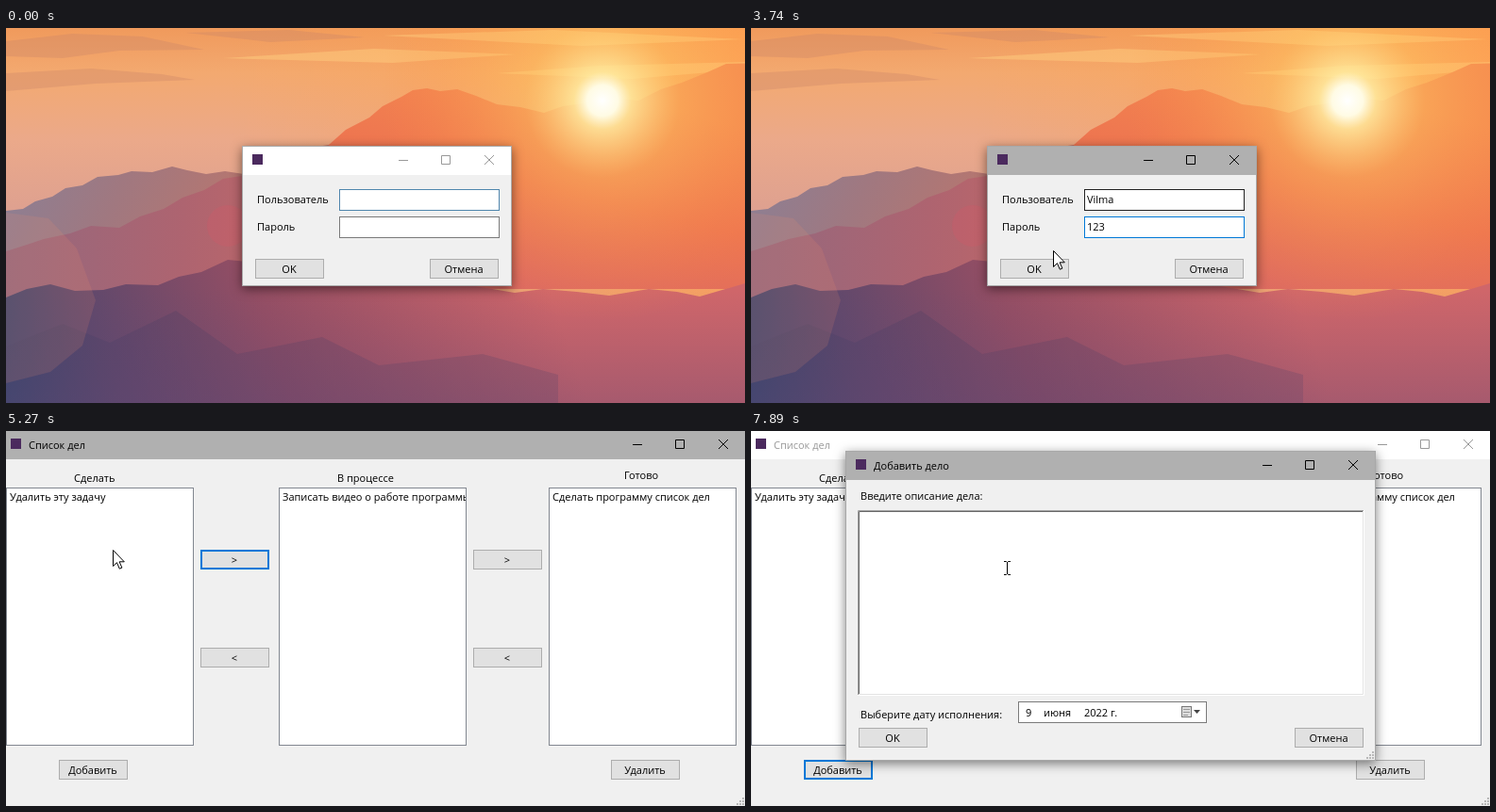
An HTML page for the animation above (7.99 s loop, 783 by 398 pixels).

```html
<!DOCTYPE html>
<html lang="ru">
<head>
<meta charset="utf-8">
<style>
html, body { margin: 0; width: 100%; height: 100%; overflow: hidden; }
svg { display: block; }
text { font: 11px "Open Sans", "Noto Sans", sans-serif; white-space: pre; }
.shadow { filter: drop-shadow(0 3px 6px rgba(0, 0, 0, .5)); }
</style>
</head>
<body>
<svg width="783" height="398" viewBox="0 0 783 398">
  <defs>
    <linearGradient id="sky" x2="0" y2="1">
      <stop stop-color="#f09a5c"/><stop offset=".12" stop-color="#f3a970"/>
      <stop offset=".3" stop-color="#eba98a"/><stop offset=".5" stop-color="#dda090"/>
    </linearGradient>
    <linearGradient id="warm" x1="0" x2="1">
      <stop offset=".3" stop-color="#ffa850" stop-opacity="0"/><stop offset="1" stop-color="#ffa050" stop-opacity=".75"/>
    </linearGradient>
    <linearGradient id="peak" gradientUnits="userSpaceOnUse" x1="600" y1="60" x2="540" y2="300">
      <stop stop-color="#f58a50"/><stop offset=".45" stop-color="#ee7650"/><stop offset="1" stop-color="#d86766"/>
    </linearGradient>
    <linearGradient id="far" x2="1" y2=".2">
      <stop stop-color="#8a8096"/><stop offset=".35" stop-color="#a07880"/><stop offset="1" stop-color="#cc745f"/>
    </linearGradient>
    <linearGradient id="middle" x2="1">
      <stop stop-color="#94687e"/><stop offset=".45" stop-color="#ae6470"/><stop offset="1" stop-color="#cf6a60"/>
    </linearGradient>
    <linearGradient id="near" gradientUnits="userSpaceOnUse" x1="0" y1="420" x2="560" y2="230">
      <stop stop-color="#2c4870"/><stop offset=".2" stop-color="#5e486c"/>
      <stop offset=".5" stop-color="#944e64"/><stop offset="1" stop-color="#cf666a"/>
    </linearGradient>
    <linearGradient id="dusk" x2="0" y2="1">
      <stop offset=".7" stop-color="#6a4874" stop-opacity="0"/><stop offset="1" stop-color="#6a4874" stop-opacity=".4"/>
    </linearGradient>
    <radialGradient id="halo">
      <stop stop-color="#fff"/><stop offset=".07" stop-color="#fffbe4"/><stop offset=".13" stop-color="#ffeb9e" stop-opacity=".85"/>
      <stop offset=".35" stop-color="#ffc860" stop-opacity=".4"/><stop offset="1" stop-color="#ff8a40" stop-opacity="0"/>
    </radialGradient>
  </defs>
  <g id="landscape">
    <path fill="url(#sky)" d="M0 0h783v398H0z"/>
    <path fill="url(#warm)" d="M0 0h783v398H0z"/>
    <path fill="#c98468" opacity=".35" d="M0 14l70-8 75 3 65 14-90 1-60 8L0 30zM0 48l90-5 75 6 35 6-105 4-95 8zM190 5l110-3 80 8-100 5z"/>
    <path fill="#ffd080" opacity=".45" d="M230 32l160-10 150 6-130 9zM400 8l180-6 200 10-170 7zM520 48l110-8 153-4v8l-120 10z"/>
    <path fill="url(#peak)" d="M320 132l22-8 18-16 25-13 14-12 20-10 12-7 15-2 14 3 18-2 20 7 22 9 25 3 25 6 20-7 28-4 32-4 20 2 24-12 22-7 27-11 20-9 40-1v240H320z"/>
    <path fill="url(#far)" d="M0 194l18-2 13-8 18-5 14-9 18-3 16-9 22-2 14-4 22 1 21-6 16 4 20 4 20-3 20 3 30-8 40-20 20-3 40 180H0z"/>
    <path fill="url(#middle)" d="M0 237l22-7 18-6 28-6 22-8 30 2 22-12 25-8 20-12 23-8 20-12 40-6 90 60 60 100H0z"/>
    <path fill="url(#near)" d="M0 286l22-9 25-5 26 7 30-1 24-6 34 1 22-9 24-5 28-13 30 3 60 10 80 10 80 3 54 9 30-4 36 3 34 4 42-7 30 3 24 5 48-14v140H0z"/>
    <path fill="#36375e" opacity=".2" d="M0 338l60-24 50 20 70-34 65 46 90-18 60 30 110-12 80 22v30H0zM110 398l120-50 90 50z"/>
    <path fill="url(#dusk)" d="M0 0h783v398H0z"/>
    <path fill="#ef8b6b" opacity=".15" d="M0 196l45 6 30 32 20 55-14 48-34 28-47 12z"/>
    <circle cx="235" cy="210" r="22" fill="#e04f64" opacity=".2"/>
    <circle cx="632" cy="77" r="235" fill="url(#halo)"/>
  </g>
  <g id="ui"></g>
</svg>
<script>
const LOOP = 7990, TICKS = 79, USER = 'Vilma';
const BLUE = '#0078d7', GRAY = '#7a7a7a', PANEL = '#f0f0f0';
const landscape = document.getElementById('landscape');
const ui = document.getElementById('ui');
const pen = document.createElement('canvas').getContext('2d');
pen.font = '11px "Open Sans", "Noto Sans", sans-serif';

const fill = (x, y, w, h, color, extra = '') =>
  `<rect x="${x}" y="${y}" width="${w}" height="${h}" fill="${color}" ${extra}/>`;
const box = (x, y, w, h, color, stroke, line = 1, extra = '') =>
  fill(x + line / 2, y + line / 2, w - line, h - line, color, `stroke="${stroke}" stroke-width="${line}" ${extra}`);
const text = (x, y, s, extra = '') => `<text x="${x}" y="${y}" ${extra}>${s}</text>`;
const inside = (p, x, y, w, h) => p.x >= x && p.x < x + w && p.y >= y && p.y < y + h;

const LOOKS = {
  plain: ['#e1e1e1', '#adadad', 1],
  hover: ['#e5f1fb', BLUE, 1],
  press: ['#cce4f7', '#005499', 1],
  focus: ['#e1e1e1', BLUE, 2],
};
function button(x, y, label, look = 'plain') {
  return box(x, y, 73, 21, ...LOOKS[look]) + text(x + 36, y + 15, label, 'text-anchor="middle"');
}

function frame(x, y, w, h, title, active, glyphs = active ? '#000' : '#999') {
  const r = x + w;
  return fill(x, y, w, h, PANEL, 'class="shadow"') +
    fill(x, y, w, 31, active ? '#b0b0b0' : '#fff') +
    box(x, y, w, h, 'none', active ? '#a8a8a8' : '#aaa') +
    fill(x + 11, y + 9, 11, 11, '#4b2a5e') +
    text(x + 30, y + 20, title, `fill="${active ? '#000' : '#999'}"`) +
    `<path fill="none" stroke="${glyphs}" d="M${r - 120} ${y + 15.5}h10m35.5-5h9v9h-9zM${r - 29} ${y + 10}l10 10m0-10l-10 10"/>`;
}

function grip(r, b) {
  let dots = '';
  for (let i = 0; i < 3; i++)
    for (let j = 0; j < 3 - i; j++) dots += fill(r - 3 - 3 * i, b - 3 - 3 * j, 2, 2, '#b8b8b8');
  return dots;
}

// Mouse path: tick, x, y
const PATH = [
  [1, 575, 293], [4, 500, 240], [6, 455, 208], [8, 435, 185], [34, 435, 185],
  [35, 400, 200], [36, 320, 236], [37, 279, 249], [39, 289, 251], [42, 289, 251],
  [43, 193, 40], [45, 190, 42], [48, 140, 62], [50, 115, 71], [51, 115, 71],
  [53, 111, 180], [55, 106, 358], [56, 103, 372], [58, 99, 350], [60, 99, 349],
  [67, 99, 349], [69, 92, 331], [77, 92, 331], [78, 271, 145],
];
function mouseAt(n) {
  const i = PATH.findIndex(p => p[0] >= n);
  if (i < 0) return { x: 271, y: 145 };
  if (i === 0) return { x: PATH[0][1], y: PATH[0][2] };
  const [a, b] = [PATH[i - 1], PATH[i]], k = (n - a[0]) / (b[0] - a[0]);
  return { x: Math.round(a[1] + (b[1] - a[1]) * k), y: Math.round(a[2] + (b[2] - a[2]) * k) };
}
const arrow = p => `<path transform="translate(${p.x} ${p.y})" fill="#fff" stroke="#000" d="M.5 .5v17l4-3.8 2.8 6.5 2.6-1.1-2.8-6.3h5.2z"/>`;
const beam = p => `<path transform="translate(${p.x} ${p.y})" fill="none" stroke="#000" d="M-3 -6.5h2.5l1 1 1-1H4M-3 7.5h2.5l1-1 1 1H4M.5 -6V7"/>`;

function field(y, value, border, caret) {
  const end = Math.round(357 + pen.measureText(value).width);
  return box(353, y, 170, 23, '#fff', border) + text(356, y + 15, value) +
    (caret ? fill(end, y + 3, 1, 15, '#000') : '');
}

function login(n, mouse) {
  const active = n >= 1, fading = n >= 42;
  const typed = [13, 15, 17, 19, 20].filter(k => n >= k).length;
  const secret = n >= 30 ? '123' : n >= 29 ? '1' : '';
  const userBorder = n < 1 ? '#4f86ad' : n < 24 ? BLUE : n < 39 ? '#222' : GRAY;
  const secretBorder = n >= 24 ? BLUE : n >= 6 && n < 10 ? '#333' : GRAY;
  const look = n >= 41 ? 'focus' : n === 40 ? 'press' : n > 35 && inside(mouse, 264, 245, 73, 21) ? 'hover' : 'plain';
  const group = fading ? 'opacity=".78" transform="translate(392.5 199) scale(.992) translate(-392.5 -199)"' : '';
  return `<g ${group}>` +
    frame(250, 125, 286, 149, '', active, fading ? 'none' : undefined) +
    text(266, 186, 'Пользователь') + text(266, 215, 'Пароль') +
    field(171, USER.slice(0, typed), userBorder, n >= 13 && n < 23) +
    field(200, secret, secretBorder, n >= 26 && n < 35) +
    button(264, 245, 'OK', look) + button(449, 245, 'Отмена') +
    (n >= 41 ? box(266, 247, 69, 17, 'none', '#000', 1, 'stroke-dasharray="1"') : '') + '</g>' +
    (fading ? fill(0, 0, 42, 101, '#ffeedd', 'opacity=".2"') : '');
}

const list = (x, item) => box(x, 60, 199, 274, '#fff', '#828790') +
  `<svg x="${x + 1}" y="61" width="197" height="272">${text(3, 13, item)}</svg>`;

function board(n, mouse) {
  const active = n < 66;
  const add = !active ? 'focus' : n === 65 ? 'press' : inside(mouse, 56, 349, 73, 21) ? 'hover' : 'plain';
  return frame(-6, -1, 790, 406, 'Список дел', active) +
    text(72, 54, 'Сделать') + text(351, 54, 'В процессе') + text(655, 51, 'Готово') +
    list(0, 'Удалить эту задачу') + list(289, 'Записать видео о работе программы') +
    list(575, 'Сделать программу список дел') +
    button(206, 126, '&gt;', n < 65 ? 'focus' : 'plain') + button(206, 230, '&lt;') +
    button(495, 126, '&gt;') + button(495, 230, '&lt;') +
    button(56, 349, 'Добавить', add) + button(641, 349, 'Удалить') + grip(783, 398);
}

function dialog() {
  return frame(100, 21, 562, 329, 'Добавить дело', true) +
    text(116, 73, 'Введите описание дела:') +
    fill(113, 84, 537, 197, '#fff') +
    '<path fill="none" stroke="#a0a0a0" d="M113.5 280V84.5H649"/>' +
    '<path fill="none" stroke="#696969" d="M114.5 279V85.5H648"/>' +
    '<path fill="none" stroke="#e3e3e3" d="M114 279.5h534.5V85"/>' +
    text(116, 305, 'Выберите дату исполнения:') +
    box(283, 287, 200, 23, '#fff', GRAY) +
    text(291, 303, '9') + text(310, 303, 'июня') + text(353, 303, '2022 г.') +
    box(456, 292, 11, 12, '#ddd', '#777') +
    '<path stroke="#999" d="M458 295.5h7m-7 3h7m-7 3h5"/><path fill="#444" d="M469 296h7l-3.5 4z"/>' +
    button(114, 315, 'OK') + button(576, 315, 'Отмена') + grip(661, 349);
}

function scene(n) {
  const mouse = mouseAt(n);
  const overText = n >= 78 || n < 43 && (inside(mouse, 353, 171, 170, 23) || inside(mouse, 353, 200, 170, 23));
  const visible = n >= 1 && (n < 14 || n >= 35);
  return (n < 43 ? login(n, mouse) : board(n, mouse)) + (n >= 78 ? dialog() : '') +
    (visible ? (overText ? beam : arrow)(mouse) : '');
}

let shown = -1;
function draw(now) {
  const n = Math.floor((now % LOOP) / LOOP * TICKS);
  if (n !== shown) {
    ui.innerHTML = scene(n);
    landscape.style.display = n < 43 ? '' : 'none';
    shown = n;
  }
  requestAnimationFrame(draw);
}
draw(performance.now());
</script>
</body>
</html>
```
